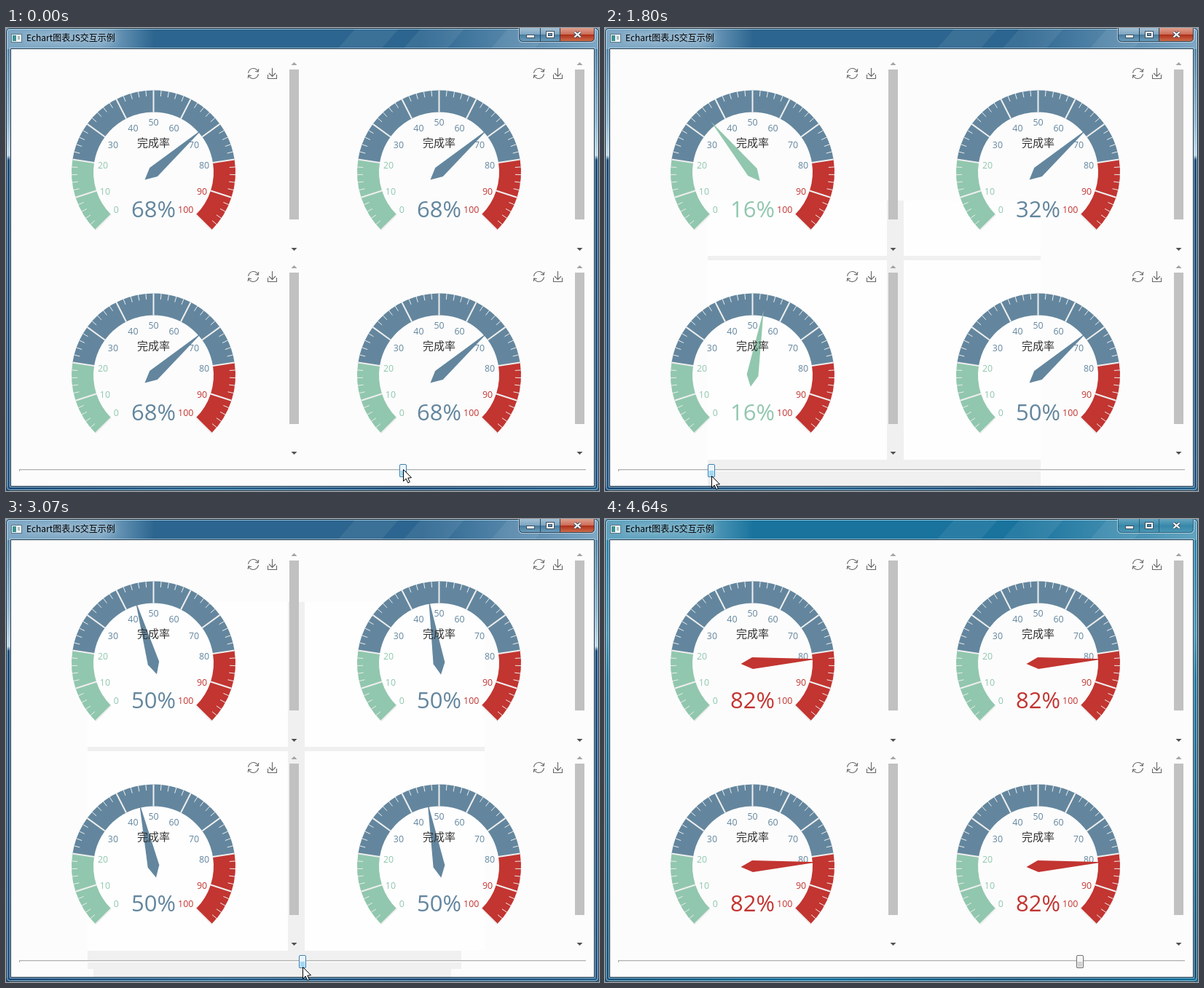
Animation, 814 px wide and 636 px high, one loop 4740 ms. Source, as an HTML page with a canvas:

```html
<!DOCTYPE html>
<html lang="zh">
<head>
<meta charset="utf-8">
<style>
html, body { margin: 0; width: 100%; height: 100%; overflow: hidden; }
canvas { display: block; }
</style>
</head>
<body>
<canvas id="stage" width="814" height="636"></canvas>
<script>
const ctx = document.getElementById('stage').getContext('2d');
const LOOP = 4740, BLUR_AT = 4640;
const FIRST_TICK = 490, TICK = 117.2;   // the screen refreshes once per tick
const LEAVE = 31;                       // tick at which the cursor is gone
const GREEN = '#91c7ae', BLUE = '#63869e', RED = '#c23531';
const DIGITS = '"Open Sans", "Noto Sans", sans-serif';
const HAN = '"Noto Sans CJK SC", "Noto Sans CJK", "Noto Sans", sans-serif';

const smooth = u => u * u * (3 - 2 * u);
const accelerate = u => u ** 1.8;
const cubicOut = u => 1 - (1 - u) ** 3;
const progress = (n, start, length) => Math.min(1, Math.max(0, (n - start) / length));

// The value starts at 68 and is dragged to 16, 50 and 82.
function follow(n, starts, lengths, ease) {
  return [-52, 34, 32].reduce((v, delta, i) => v + delta * ease(progress(n, starts[i], lengths[i])), 68);
}
const sliderValue = n => follow(n, [1.85, 16, 23.5], [5, 6, 3.5], smooth);
const sliderX = n => 23.5 + 7.67 * sliderValue(n);
const textValue = (g, n) => Math.round(follow(n, [g.textStart, 16.5, 25], [g.textLength, 5.5, 4], accelerate));
const needleValue = (g, n) => follow(n, g.needleStarts, [4, 2.5, 2], cubicOut);

// The four views lag behind the slider by different amounts.
const gauges = [
  { x: 0, y: 0, textStart: 2, textLength: 9, needleStarts: [9.88, 20.9, 29.33] },
  { x: 392, y: 0, textStart: 2, textLength: 11, needleStarts: [11, 20.66, 29.68] },
  { x: 0, y: 279, textStart: 2, textLength: 9, needleStarts: [10.59, 20.79, 29.63] },
  { x: 392, y: 279, textStart: 6, textLength: 9, needleStarts: [11, 20.7, 29.55] },
];

// Repainted areas show the grey widget background: tick, left, top, right, bottom.
const repaints = [[3, 190, 237, 598, 625], [6, 141, 237, 598, 629], [12, 116, 114, 657, 593],
  [12, 120, 237, 611, 629], [17, 112, 164, 625, 618], [26, 172, 107, 665, 629]];

const angleOf = value => (value * 2.7 - 225) * Math.PI / 180;
const colorOf = value => value <= 20 ? GREEN : value <= 80 ? BLUE : RED;

function rect(x, y, w, h, fill) {
  ctx.fillStyle = fill;
  ctx.fillRect(x, y, w, h);
}

function outline(x, y, w, h, stroke, width = 1, radius = 0) {
  ctx.beginPath();
  ctx.roundRect(x, y, w, h, radius);
  ctx.strokeStyle = stroke;
  ctx.lineWidth = width;
  ctx.stroke();
}

function line(points, stroke, width = 1) {
  ctx.beginPath();
  points.forEach(([x, y]) => ctx.lineTo(x, y));
  ctx.strokeStyle = stroke;
  ctx.lineWidth = width;
  ctx.stroke();
}

function polygon(points, fill) {
  ctx.beginPath();
  points.forEach(([x, y]) => ctx.lineTo(x, y));
  ctx.closePath();
  ctx.fillStyle = fill;
  ctx.fill();
}

function label(str, x, y, font, fill, align = 'center') {
  ctx.font = font;
  ctx.fillStyle = fill;
  ctx.textAlign = align;
  ctx.fillText(str, x, y);
}

function gradient(x1, y1, ...stops) {
  const g = ctx.createLinearGradient(0, 0, x1, y1);
  stops.forEach(([pos, color]) => g.addColorStop(pos, color));
  return g;
}

function drawFrame(active) {
  const base = active ? '#2c658f' : '#19739d';
  const dark = active ? '#23507c' : '#205b80';
  const pale = active ? '#7fa8c5' : '#62a3bf';
  rect(0, 0, 814, 636, active
    ? gradient(0, 636, [0, '#47799f'], [.2, '#93b7cf'], [.275, '#c8dbe7'], [.285, dark], [1, '#2d5b88'])
    : gradient(0, 636, [0, '#2d84aa'], [.25, '#4c9aba'], [.35, '#257c9f'], [1, dark]));
  rect(0, 0, 814, 29, gradient(814, 0, [0, pale], [.16, pale], [.25, base], [.7, base], [1, pale]));
  for (const x of [480, 570, 690])
    polygon([[x, 0], [x + 60, 0], [x + 35, 29], [x - 25, 29]], 'rgba(255,255,255,.07)');
  rect(0, 630, 814, 6, gradient(814, 0, [0, dark], [.35, base], [.7, dark], [1, base]));

  outline(.5, .5, 813, 635, '#1a2a38', 1, 5);
  outline(1.5, 1.5, 811, 633, 'rgba(190,230,248,.75)', 1, 4);
  outline(5.5, 27.5, 803, 603, 'rgba(200,230,245,.6)');
  outline(6.5, 28.5, 801, 601, '#1d3447');

  rect(7, 8, 15, 12, '#5d7684');
  rect(8, 9, 13, 10, '#f4f8f8');
  rect(9, 10, 5, 8, '#3e9292');
  rect(16, 11, 3, 5, '#a9c0c4');
  ctx.shadowColor = 'rgba(255,255,255,.85)';
  ctx.shadowBlur = 10;
  label('Echart图表JS交互示例', 28, 18, '12px ' + HAN, '#000', 'left');
  ctx.shadowBlur = 0;
  drawButtons(active);
}

function drawButtons(active) {
  const glass = active
    ? gradient(0, 19, [0, '#a3c1d5'], [.48, '#7da5c0'], [.5, '#477c9f'], [1, '#6fa0bf'])
    : gradient(0, 19, [0, '#66a5bf'], [.5, '#3788aa'], [1, '#4d98b5']);
  const red = gradient(0, 19, [0, '#dfa08f'], [.48, '#cb6a55'], [.5, '#b0301a'], [1, '#cf7350']);
  const edge = active ? '#284459' : '#28617d';
  ctx.save();
  ctx.beginPath();
  ctx.roundRect(704, -5, 104, 24, 5);
  ctx.clip();
  rect(704, 0, 104, 19, glass);
  if (active) rect(760, 0, 48, 19, red);
  ctx.restore();
  outline(703.5, -5, 105, 24.5, 'rgba(255,255,255,.5)', 1, 5);
  outline(704.5, -5, 103, 23.5, edge, 1, 5);
  for (const x of [733.5, 760.5]) line([[x, 0], [x, 18]], edge);
  for (const [color, grow] of [['#3d4f60', 2], ['#fff', 0]]) {
    rect(715 - grow / 2, 10 - grow / 2, 10 + grow, 3 + grow, color);
    outline(743, 6, 8, 6, color, 2 + grow);
    line([[780.5, 5.5], [788.5, 12.5]], color, 2.2 + grow);
    line([[788.5, 5.5], [780.5, 12.5]], color, 2.2 + grow);
  }
}

function drawBackground(n, active) {
  rect(7, 29, 800, 600, '#fcfcfc');
  if (!active) return;
  ctx.save();
  ctx.beginPath();
  for (const [start, left, top, right, bottom] of repaints)
    if (n >= start) ctx.rect(left, top, right - left, bottom - top);
  ctx.clip();
  rect(7, 29, 800, 600, '#fefefe');
  rect(387, 29, 23, 600, '#f0f0f0');
  rect(7, 313, 800, 6, '#f0f0f0');
  rect(7, 593, 800, 36, '#f0f0f0');
  ctx.restore();
}

function drawTools(extra) {
  const grey = '#666';
  for (const turn of [0, Math.PI]) {
    ctx.save();
    ctx.translate(339.5, 62.5);
    ctx.rotate(turn);
    ctx.beginPath();
    ctx.arc(0, 0, 7, -Math.PI * .97, -.35);
    ctx.strokeStyle = grey;
    ctx.lineWidth = 1.1;
    ctx.stroke();
    line([[7.3, -6.5], [6.6, -2.4], [2.6, -3]], grey, 1.1);
    ctx.restore();
  }
  line([[359.5, 64], [359.5, 69.5], [371.5, 69.5], [371.5, 64]], grey, 1.1);
  line([[365.5, 55], [365.5, 66]], grey, 1.1);
  line([[361, 62], [365.5, 66.5], [370, 62]], grey, 1.1);

  rect(389, 57, 13, 206 + 2 * extra, '#c1c1c1');
  polygon([[391.5, 51], [395.5, 47], [399.5, 51]], '#a3a3a3');
  polygon([[391.5, 302 + extra], [395.5, 306 + extra], [399.5, 302 + extra]], '#505050');
}

function drawGauge(g, n) {
  const value = textValue(g, n), color = colorOf(value), R = 112.5;
  ctx.save();
  ctx.translate(g.x, g.y);
  drawTools(g.y > 0 ? 1 : 0);
  ctx.translate(202.5, 198);

  ctx.lineWidth = 30;
  for (const [from, to] of [[0, 20], [20, 80], [80, 100]]) {
    ctx.beginPath();
    ctx.arc(0, 0, R - 15, angleOf(from), angleOf(to));
    ctx.strokeStyle = colorOf(to);
    ctx.stroke();
  }
  for (let v = 0; v <= 100; v += 2) {
    const a = angleOf(v), c = Math.cos(a), s = Math.sin(a), major = v % 10 === 0;
    const inner = R - (major ? 30 : 8);
    line([[c * R, s * R], [c * inner, s * inner]], '#eee', major ? 2 : 1);
    if (!major) continue;
    const align = c < -.4 ? 'left' : c > .4 ? 'right' : 'center';
    const shift = s < -.4 ? 6 : s > .4 ? -6 : 0;
    label(v, c * 77.5, s * 77.5 + shift + 7, '12.4px ' + DIGITS, colorOf(v), align);
  }

  ctx.save();
  ctx.rotate(angleOf(needleValue(g, n)));
  polygon([[-16, 0], [0, -8], [.8 * R, 0], [0, 8]], color);
  ctx.restore();
  label('完成率', 0, -35.5, '15px ' + HAN, '#333');
  label(value + '%', 0, 62, '31px ' + DIGITS, color);
  ctx.restore();
}

function drawSlider(n) {
  rect(18, 606, 778, 1, '#b2b2b2');
  rect(18, 607, 778, 1, '#e3e5e5');
  rect(18, 608, 778, 1, '#fff');
  rect(18, 606, 1, 3, '#a5a5a5');
  const x = Math.round(sliderX(n)) - 5;
  const [edge, top, bottom] = n >= LEAVE ? ['#707070', '#f5f5f5', '#d2d2d2']
    : n >= 26 ? ['#10a8cc', '#d6f6fd', '#a5e6f8']
    : n >= 0 && n < 7 ? ['#2c628b', '#b9e2f6', '#3d9fd6']
    : ['#3c7fb1', '#eaf6fd', '#a0d8f3'];
  rect(x, 599, 10, 18, gradient(0, 1216, [0, top], [.5, top], [.5, bottom], [1, bottom]));
  outline(x + 1.5, 600.5, 7, 15, 'rgba(255,255,255,.6)');
  outline(x + .5, 599.5, 9, 17, edge, 1, 1.5);
}

function drawCursor(n) {
  if (n >= LEAVE) return;
  const y = 606 + 9 * smooth(progress(n, 3, 3)) + 3 * smooth(progress(n, 26, 4));
  const tip = [Math.floor(sliderX(n + .2)) + .5, Math.round(y) + .5];
  const arrow = [[0, 0], [0, 16], [3.7, 12.6], [6.3, 18.3], [8.8, 17.2], [6.3, 11.6], [11, 11.2], [0, 0]];
  ctx.save();
  ctx.translate(...tip);
  polygon(arrow, '#fff');
  line(arrow, '#000');
  ctx.restore();
}

function draw() {
  const now = performance.now() % LOOP;
  const n = Math.floor((now - FIRST_TICK) / TICK), active = now < BLUR_AT;
  drawFrame(active);
  drawBackground(n, active);
  gauges.forEach(g => drawGauge(g, n));
  drawSlider(n);
  drawCursor(n);
  requestAnimationFrame(draw);
}
draw();
</script>
</body>
</html>
```
